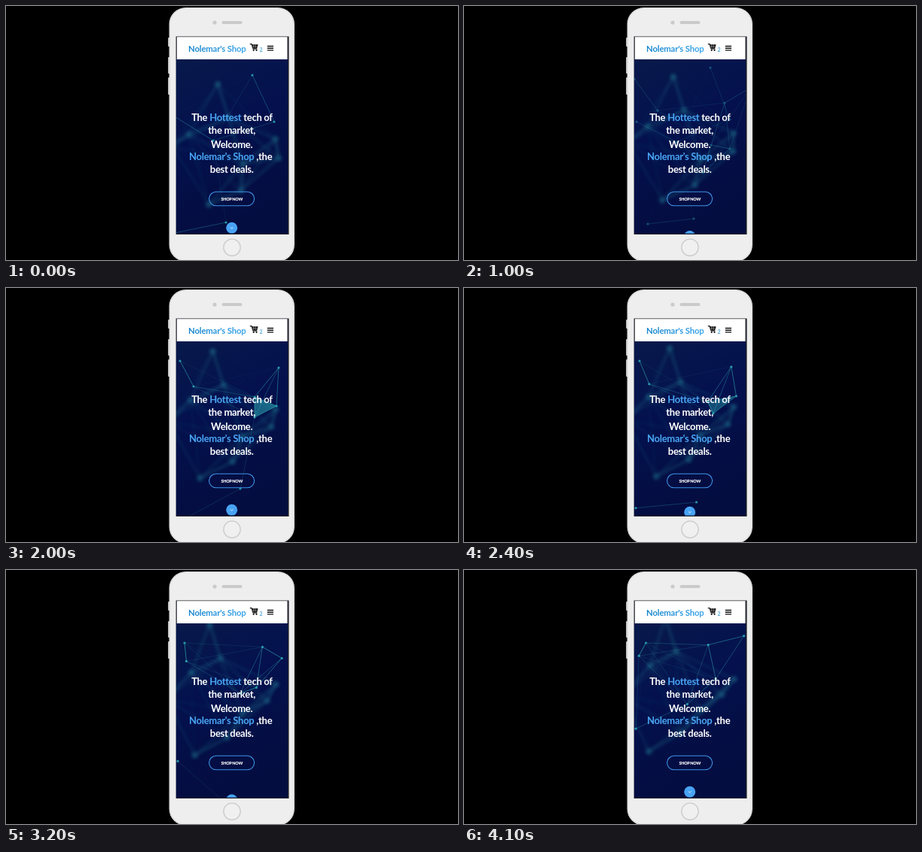
Write an HTML page that moves like this. It is 600 px wide and 338 px high and loops after 4200 ms.

```html
<!DOCTYPE html>
<html lang="en">
<head>
<meta charset="utf-8">
<title>Shop on a phone</title>
<style>
html, body { margin: 0; width: 100%; height: 100%; overflow: hidden; background: #000; }
svg { display: block; width: 600px; height: 338px; }
text { font-family: Lato, "Open Sans", sans-serif; font-weight: 700; }
.head { font-size: 13px; letter-spacing: -.29px; fill: #fff; }
.hot { fill: #4aa5f5; }
.mesh line { stroke: #2fa9b0; }
.mesh circle, .mesh polygon { fill: #30b4bd; }
</style>
</head>
<body>
<svg viewBox="0 0 600 338" xmlns="http://www.w3.org/2000/svg">
  <defs>
    <clipPath id="screen"><rect x="226" y="71" width="148" height="231.800"/></clipPath>
    <linearGradient id="sky" x1="0" y1="0" x2=".3" y2="1">
      <stop offset="0" stop-color="#08194b"/>
      <stop offset=".45" stop-color="#04114e"/>
      <stop offset="1" stop-color="#040d40"/>
    </linearGradient>
    <linearGradient id="brand">
      <stop offset="0" stop-color="#1685cc"/>
      <stop offset="1" stop-color="#40a9ec"/>
    </linearGradient>
    <filter id="soft" filterUnits="userSpaceOnUse" x="200" y="50" width="200" height="280">
      <feGaussianBlur stdDeviation="2"/>
    </filter>
  </defs>

  <rect width="600" height="338"/>
  <g fill="#e0e0e0">
    <rect x="215.200" y="42" width="3" height="12" rx="1"/>
    <rect x="215.200" y="68" width="3" height="22" rx="1"/>
    <rect x="215.200" y="95" width="3" height="23" rx="1"/>
  </g>
  <rect x="216.500" y="2" width="166.500" height="338" rx="22" fill="#dadada"/>
  <rect x="218" y="3.200" width="163.500" height="335.600" rx="21" fill="#eee"/>
  <circle cx="277" cy="22" r="2.600" fill="#cacaca"/>
  <rect x="286.500" y="20" width="27" height="4" rx="2" fill="#cacaca"/>
  <circle cx="300" cy="321.300" r="11.200" fill="#f0f0f0" stroke="#cbcbcb" stroke-width="1.300"/>

  <rect x="225.600" y="40.500" width="149.900" height="263.500" fill="#1a1c26"/>
  <rect x="226.800" y="41.200" width="146.700" height="30" fill="#fff"/>

  <g clip-path="url(#screen)">
    <rect x="226" y="71" width="148" height="232" fill="url(#sky)"/>
    <g id="far" class="mesh" filter="url(#soft)" opacity=".42"></g>
    <g id="near" class="mesh"></g>
    <g id="arrow">
      <circle r="7.500" fill="#48a3f3"/>
      <path d="M-1.800-.7 0 .9 1.800-.7" fill="none" stroke="#fff" stroke-width=".8"/>
    </g>
  </g>

  <text x="242" y="60.500" font-size="11.300" letter-spacing="-.15" fill="url(#brand)">Nolemar's Shop</text>
  <g fill="none" stroke="#111" stroke-width="1.100">
    <path d="M323.800 50.600h2.300l2 6.300h5.200"/>
    <path d="M326.500 51.800h7.400l-1.200 4.200h-4.900z" fill="#111"/>
    <path d="M328.600 51v5m2.500-5v5M326.500 53.800h7" stroke="#fff" stroke-width=".35"/>
    <circle cx="328.700" cy="58.800" r=".6"/>
    <circle cx="332.500" cy="58.800" r=".6"/>
    <path d="M346.800 53.500h8.200m-8.200 2.700h8.200m-8.200 2.700h8.200" stroke-width="1.400"/>
  </g>
  <text x="336.600" y="60.500" font-size="7" fill="#56acd9">2</text>

  <g class="head">
    <text x="246.200" y="152.700">The <tspan class="hot">Hottest</tspan> tech of</text>
    <text x="299.700" y="169.500" text-anchor="middle">the market,</text>
    <text x="299.700" y="188.600" text-anchor="middle">Welcome.</text>
    <text x="243" y="205.200"><tspan class="hot">Nolemar's Shop</tspan> ,the</text>
    <text x="299.700" y="221.800" text-anchor="middle">best deals.</text>
  </g>
  <rect x="269.600" y="247.300" width="60" height="18.500" rx="9.250" fill="none" stroke="#3d93e6" stroke-width="1.100"/>
  <text x="299.700" y="258.700" font-size="5.500" letter-spacing="-.3" text-anchor="middle" fill="#fff" style="font-weight:900">SHOP NOW</text>
</svg>
<script>
const LOOP = 4200, STEP = 100, BOUNCE = 2050;
const REACH = 122, FACET = 48;
const byId = id => document.getElementById(id);
const far = byId("far"), near = byId("near"), arrow = byId("arrow");

// Nodes drift in straight lines: x, y, speed x, speed y (per second)
const opening = [
  [327, 92, 0, -10], [356, 154, -3, -3], [275, 179, 7, 2],
  [224, 302, 20, -12], [222, 146, 7, 8], [292, 288, 13, -5]
];
const main = [
  [221, 97, 5, 0], [265, 147, -8, -8], [362, 113, -16, 16], [347, 223, 6, -33],
  [323, 177, -6, 45], [228, 408, 0, -48], [398, 112, -18, -3], [326, 198, 2, -13]
];
let seed = 11;
const rnd = () => (seed = seed * 16807 % 2147483647) / 2147483647;
const backdrop = Array.from({ length: 9 }, () =>
  [220 + rnd() * 160, 85 + rnd() * 225, rnd() * 12 - 6, -4 - rnd() * 8]);

const gap = (p, q) => Math.hypot(p[0] - q[0], p[1] - q[1]);
const ramp = (from, to, v) => {
  const k = Math.max(0, Math.min(1, (v - from) / (to - from)));
  return k * k * (3 - 2 * k);
};

// Close nodes are linked, the closer the brighter; tight triples form a facet
function mesh(nodes, sec, width, radius) {
  const pts = nodes.map(([x, y, vx, vy]) => [x + vx * sec, y + vy * sec]);
  let out = "";
  pts.forEach((p, i) => {
    out += `<circle cx="${p[0]}" cy="${p[1]}" r="${radius}" opacity=".8"/>`;
    pts.slice(i + 1).forEach((q, j) => {
      const d = gap(p, q);
      if (d > REACH) return;
      out += `<line x1="${p[0]}" y1="${p[1]}" x2="${q[0]}" y2="${q[1]}"
        stroke-width="${width}" opacity="${.95 * (1 - d / REACH)}"/>`;
      for (const r of pts.slice(i + j + 2)) {
        const size = Math.max(d, gap(p, r), gap(q, r));
        const shade = .5 * ramp(FACET, FACET * .7, size);
        if (shade) out += `<polygon points="${[p, q, r].join(" ")}" opacity="${shade}"/>`;
      }
    });
  });
  return out;
}

function draw(ms) {
  const sec = ms / 1000, mix = ramp(.7, 1.3, sec);
  far.innerHTML = mesh(backdrop, sec, 3, 4);
  near.innerHTML =
    `<g opacity="${1 - mix}">${mesh(opening, sec, .9, 1.6)}</g>` +
    `<g opacity="${mix}">${mesh(main, sec, .9, 1.6)}</g>`;
  const drop = 5.6 * (1 - Math.cos(2 * Math.PI * ms / BOUNCE));
  arrow.setAttribute("transform", `translate(299.700 ${295.300 + drop})`);
}

const start = performance.now();
function tick() {
  const ms = (performance.now() - start) % LOOP;
  draw(Math.floor(ms / STEP) * STEP);
  requestAnimationFrame(tick);
}
draw(0);
requestAnimationFrame(tick);
</script>
</body>
</html>
```
